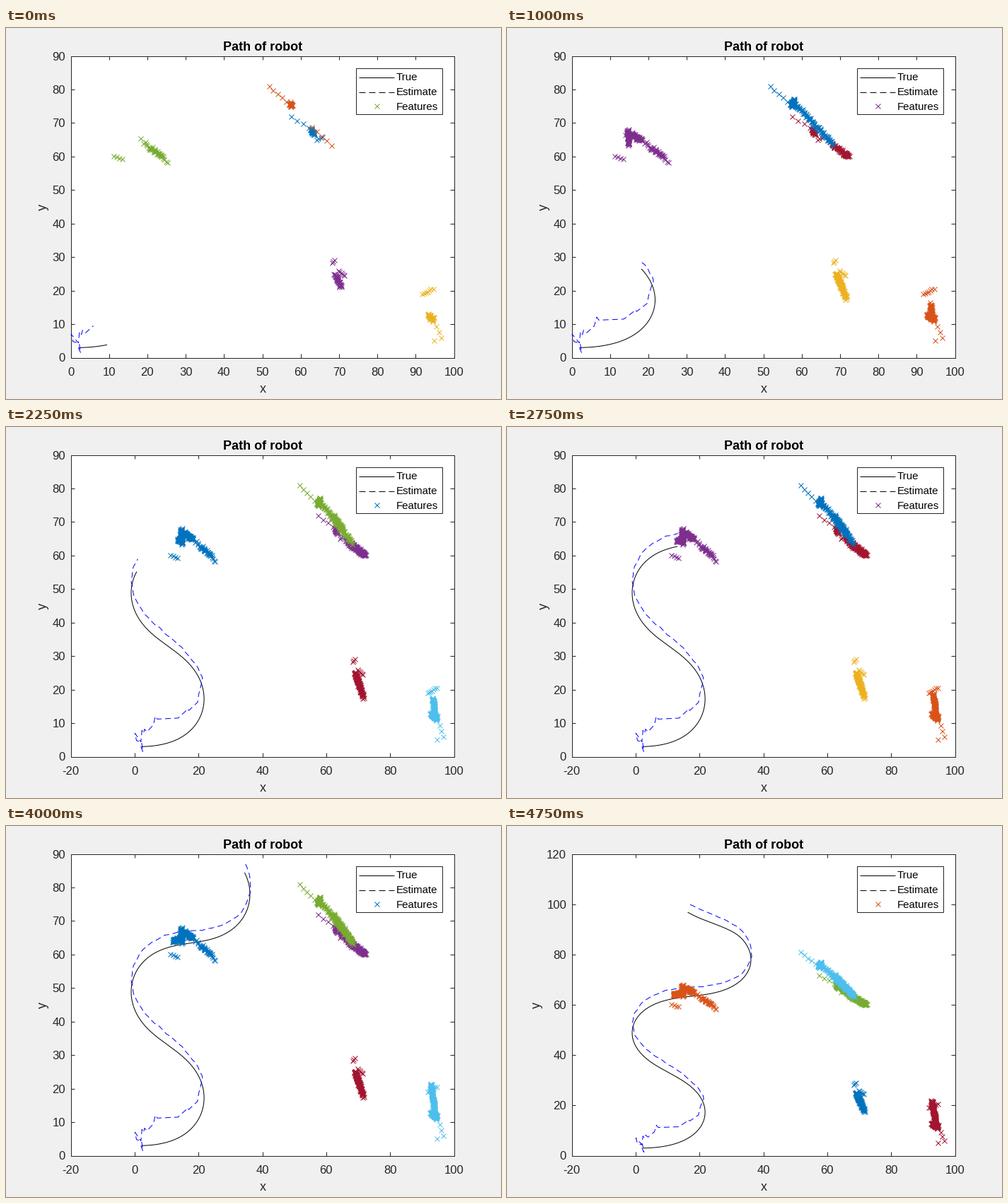
A matplotlib script for the animation above (5000 ms loop, 700 px wide and 525 px high).

```python
import numpy as np
import matplotlib.pyplot as plt
from matplotlib.animation import FuncAnimation
from matplotlib.patches import Rectangle

plt.rcParams["font.family"] = "Liberation Sans"
W, H, DPI, FRAMES = 700, 525, 100, 20
PX = 72 / DPI
LEFT, RIGHT, TOP, BOTTOM = 91.5, 633.5, 39.5, 466.5
DARK = "#262626"
CYCLE = ["#0072bd", "#d95319", "#edb120", "#7e2f8e", "#77ac30", "#4dbeee", "#a2142f"]
rng = np.random.default_rng(7)

LENGTH = 149.2   # whole drive
JOIN = 30        # distance after which the estimate has settled

# First sightings of each feature: x0, y0, x1, y1, count
SIGHTED = [
    [(57.4, 72, 62, 68.6, 4), (62.7, 68.2, 63.4, 66.8, 30), (64.2, 65, 65.5, 66, 4)],
    [(51.6, 81.1, 56.2, 76.5, 5), (57.2, 75.9, 57.6, 75.4, 30), (62.8, 68.8, 68, 63.3, 5)],
    [(91.7, 19, 94.4, 20.5, 7), (93.1, 13, 94.6, 11.3, 32), (95.3, 9.4, 96.5, 6, 3),
     (94.8, 5.4, 94.8, 5.4, 1)],
    [(68.1, 28.2, 68.8, 29.3, 3), (69.8, 25.9, 71.3, 24.5, 6), (68.9, 24.9, 70.3, 21.5, 45)],
    [(11.2, 60.2, 13.3, 59.3, 4), (18.4, 64.9, 25, 58.5, 18), (20.5, 63, 24, 60, 22)],
]

# Later drift: first frame, last frame, x0, y0, x1, y1
DRIFT = [
    [(1, 3, 67.8, 63.6, 72.3, 60.1), (4, 7, 72, 60.3, 67, 63.6), (8, 19, 67, 64, 63, 68.5)],
    [(1, 2, 57.3, 75.4, 58, 77), (1, 4, 58, 76, 68, 64), (5, 14, 62, 72, 68.2, 63.7)],
    [(1, 3, 92.6, 12.8, 94.4, 11.6), (2, 4, 93.7, 12, 93.6, 16), (5, 17, 93.7, 15, 92.6, 21.8)],
    [(1, 4, 68.9, 25, 71.5, 17.8)],
    [(1, 3, 18, 65, 15.5, 66.8), (2, 4, 14.5, 68, 14.8, 63.6), (5, 17, 14.5, 65, 11.7, 64)],
]

# Estimate while it is still searching
SEARCH = np.array([
    (2, 3), (2.6, 1.4), (2.2, 4.3), (.6, 4.8), (.1, 7), (2, 4.4), (2.3, 7.8), (2.8, 6.9),
    (3.1, 8.2), (3.9, 7.4), (5.9, 9.5), (6.5, 12.1), (7.1, 11.2), (13.6, 11.5), (16, 13.6),
    (16.3, 14.3), (17, 13.8), (19.7, 16.2), (20.1, 18.7), (21, 22)])
START = 10       # where the search stands after the first frame


def arc_lengths(pts):
    return np.concatenate([[0], np.cumsum(np.hypot(*np.diff(pts, axis=0).T))])


def drive(step=.1):
    """Slalom: the heading swings as a cosine of the distance."""
    s = np.arange(0, LENGTH + step, step)
    turn = 76.7 - 68.75 * np.cos(2 * np.pi * (s - 1) / 93)
    turn += 9 * np.clip((s - 128) / 6, 0, 1) - 8 * np.exp(-s / 3.5)
    a = np.radians(turn)
    xy = np.column_stack([np.cos(a), np.sin(a)]) * step
    return s, np.array([2.05, 3]) + np.cumsum(xy, axis=0)


def settled_estimate(s, path):
    lift = np.interp(s, [30, 37, 48, 60, 90, 112, 134, 149],
                     [2.4, 2.1, 3.2, 3.8, 3.9, 2.7, 3, 3.7])
    knots = np.arange(0, LENGTH + 2, 1.5)
    wobble = [np.interp(s, knots, rng.normal(0, .13, knots.size)) for _ in "xy"]
    return path + np.column_stack([wobble[0] + .15, wobble[1] + lift])


def streak(k0, k1, x0, y0, x1, y1, n):
    """Rows of (frame of first sight, x, y) strewn along a line."""
    t = np.linspace(0, 1, n)
    spread = .08 if n < 9 else .25
    k = np.floor(k0 + t * (k1 - k0 + .99))
    x = x0 + t * (x1 - x0) + rng.normal(0, spread * .7, n)
    y = y0 + t * (y1 - y0) + rng.normal(0, spread, n)
    return np.column_stack([k, x, y])


dist, true_path = drive()
settled = settled_estimate(dist, true_path)
search_len = arc_lengths(SEARCH)
clouds = [np.vstack([streak(0, 0, *row) for row in first]
                    + [streak(*row, min(20 * (row[1] - row[0] + 1), 110)) for row in later])
          for first, later in zip(SIGHTED, DRIFT)]

fig = plt.figure(figsize=(W / DPI, H / DPI), dpi=DPI, facecolor="#f0f0f0")
ax = fig.add_axes([0, 0, 1, 1])


def estimate(s):
    first = LENGTH / FRAMES
    if s >= JOIN:
        return np.vstack([SEARCH, settled[(dist >= JOIN) & (dist <= s)]])
    reach = np.interp(s, [first, JOIN], [search_len[START], search_len[-1]])
    tip = [np.interp(reach, search_len, SEARCH[:, i]) for i in (0, 1)]
    return np.vstack([SEARCH[search_len < reach], tip])


def label(x, y, s, size, color=DARK, **kw):
    ax.text(x, y, s, fontsize=size * PX, color=color, **kw)


def line(x, y, color="black", z=3, **kw):
    ax.plot(x, y, color=color, lw=PX, zorder=z, solid_capstyle="butt",
            dash_capstyle="butt", **kw)


def crosses(x, y, color, z):
    ax.plot(x, y, "x", color=color, ms=7 * PX, mew=PX, zorder=z)


def box(x, y, w, h, z):
    ax.add_patch(Rectangle((x, y), w, h, fc="white", ec=DARK, lw=PX, zorder=z))


def legend(color):
    box(494.5, 56.5, 122, 65, 8)
    line([499, 549], [69.5] * 2, z=9)
    line([499, 549], [90.5] * 2, z=9, ls=(0, (9, 5)))
    crosses([523.5], [110], color, 9)
    for i, s in enumerate(("True", "Estimate", "Features")):
        label(552, 74 + 21 * i, s, 15, "black", zorder=9)


def draw(k):
    ax.clear()
    ax.set(xlim=(0, W), ylim=(H, 0))
    ax.axis("off")

    xmin, xstep = (0, 10) if k < 8 else (-20, 20)
    ymax, ystep = (90, 10) if k < 17 else (100, 10) if k < 19 else (120, 20)

    def px(x):
        return LEFT + (x - xmin) * (RIGHT - LEFT) / (100 - xmin)

    def py(y):
        return BOTTOM - y * (BOTTOM - TOP) / ymax

    box(LEFT, TOP, RIGHT - LEFT, BOTTOM - TOP, 1)
    for v in range(xmin, 101, xstep):
        x = px(v)
        line([x, x], [BOTTOM, BOTTOM - 5.5], DARK, 2)
        line([x, x], [TOP, TOP + 5.5], DARK, 2)
        label(x, 492, str(v), 16.67, ha="center")
    for v in range(0, ymax + 1, ystep):
        y = py(v)
        line([LEFT, LEFT + 5.5], [y, y], DARK, 2)
        line([RIGHT, RIGHT - 5.5], [y, y], DARK, 2)
        label(84, y + 6, str(v), 16.67, ha="right")

    label(363, 32, "Path of robot", 18, "black", ha="center", weight="bold")
    label(363.5, 516, "x", 18, ha="center")
    label(52 if k < 17 else 42, 253, "y", 18, ha="center", va="center", rotation=90)

    s = LENGTH * (k + 1) / FRAMES
    walked = true_path[dist <= s]
    line(px(walked[:, 0]), py(walked[:, 1]))
    guess = estimate(s)
    line(px(guess[:, 0]), py(guess[:, 1]), "blue", ls=(0, (8, 5)))

    for i, cloud in enumerate(clouds):
        color = CYCLE[(5 * k + i) % len(CYCLE)]
        seen = cloud[cloud[:, 0] <= k]
        crosses(px(seen[:, 1]), py(seen[:, 2]), color, 4 + i / 10)
    legend(color)
    return []


anim = FuncAnimation(fig, draw, frames=FRAMES, interval=250, init_func=lambda: draw(0),
                     repeat=True, repeat_delay=0, blit=False)
plt.show()
```
